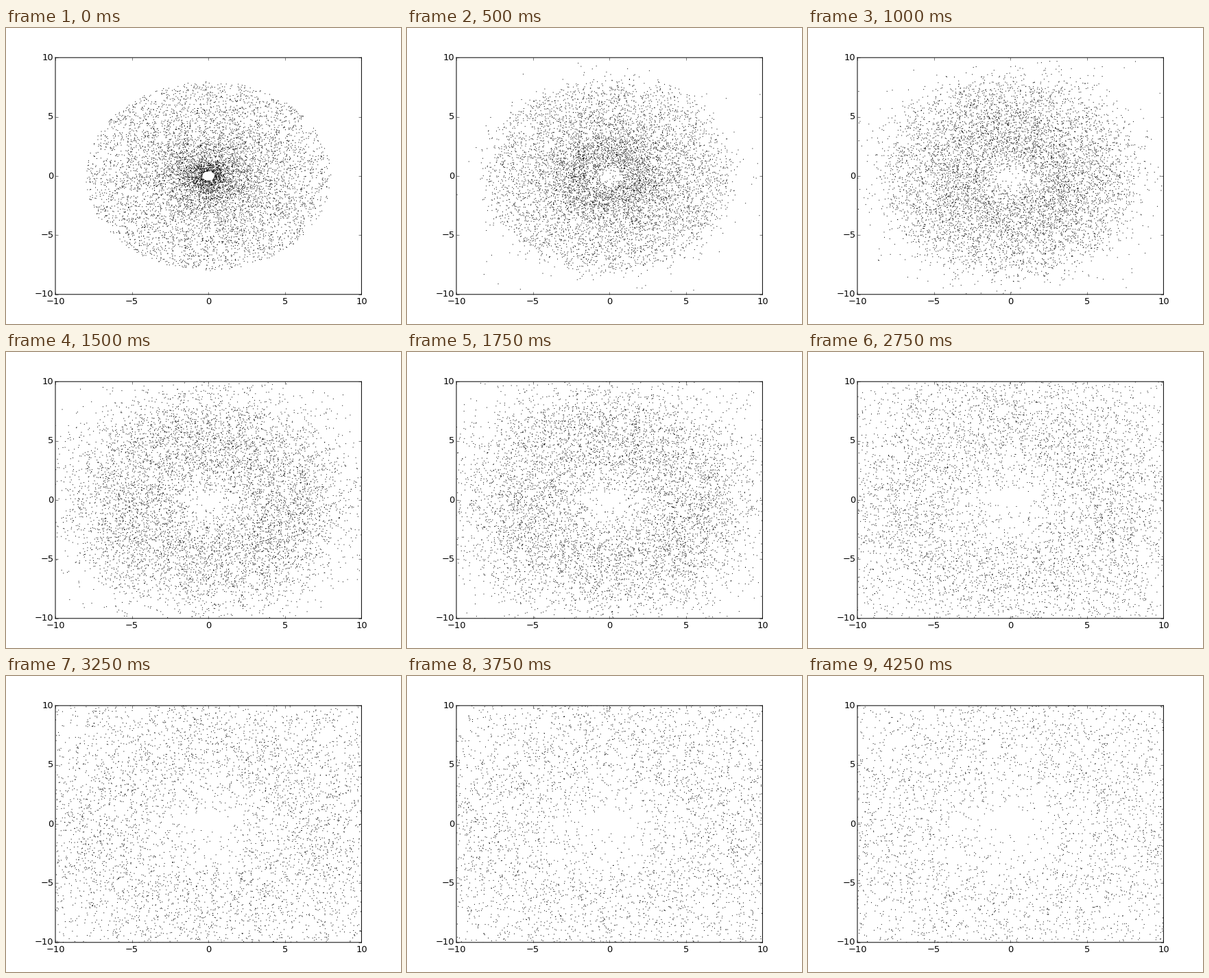
Write a matplotlib script that moves like this. It is 576 px wide and 432 px high and loops after 4500 ms.

```python
import numpy as np
import matplotlib.pyplot as plt
from matplotlib.animation import FuncAnimation

FRAMES, INTERVAL = 18, 250
COUNT, FAST = 7500, 150
R_MIN, R_MAX = 0.4, 8.0

plt.style.use("classic")
plt.rcParams.update({
    "font.family": "DejaVu Sans",
    "font.size": 13,
    "path.snap": False,
    "savefig.dpi": "figure",
})

rng = np.random.default_rng(7)

# Radii are uniform, so the disc is densest near its centre.
radius = rng.uniform(R_MIN, R_MAX, COUNT)
angle = rng.uniform(0, 2 * np.pi, COUNT)
speed = rng.rayleigh(0.62 / radius ** 0.1)

# A few particles near the centre are flung out quickly.
radius[:FAST] = rng.uniform(R_MIN, 1.5, FAST)
speed[:FAST] = rng.uniform(2, 11, FAST)

# Headings scatter around the tangent, in either sense.
spin = rng.choice([-1, 1], COUNT)
heading = angle + spin * np.pi / 2 + rng.normal(0, 0.4, COUNT)


def polar(length, theta):
    return np.column_stack([length * np.cos(theta), length * np.sin(theta)])


start = polar(radius, angle)
velocity = polar(speed, heading)

fig = plt.figure(figsize=(8, 6), dpi=72, facecolor="white")
ax = fig.add_axes([0.125, 0.1, 0.775, 0.8])
# One size per dot keeps sub-pixel positions.
dots = ax.scatter(*start.T, s=np.ones(COUNT), c="black", marker="s",
                  linewidths=0)
ax.set_xlim(-10, 10)
ax.set_ylim(-10, 10)
ax.set_xticks(range(-10, 11, 5))
ax.set_yticks(range(-10, 11, 5))
ax.tick_params(axis="y", pad=2.5)


def update(step):
    dots.set_offsets(start + velocity * step)
    return dots,


animation = FuncAnimation(fig, update, frames=FRAMES, interval=INTERVAL,
                          repeat=True, repeat_delay=0)
plt.show()
```
